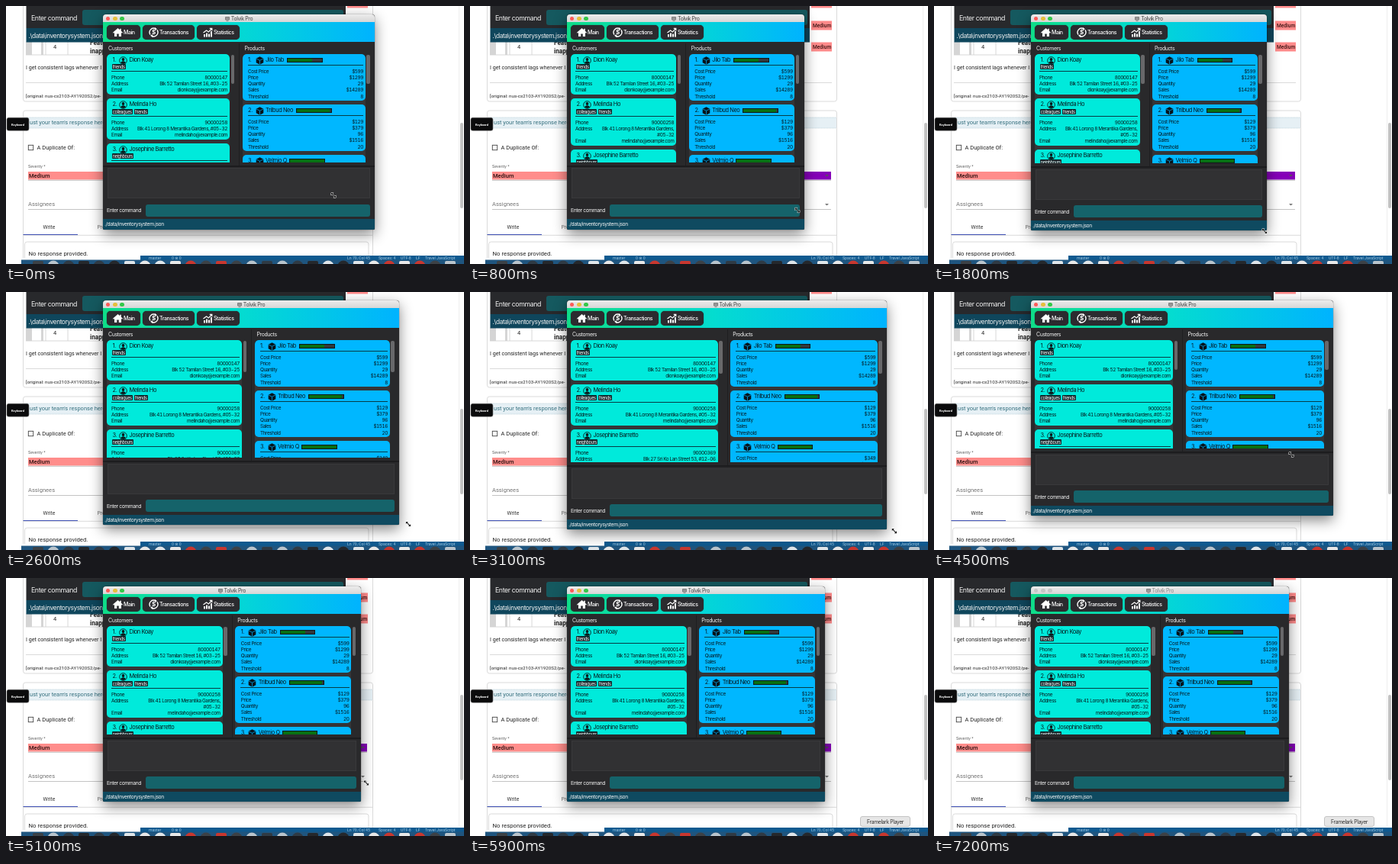
An HTML page that plays this animation: 600 by 338 pixels, repeating every 7.3 s.

```html
<!DOCTYPE html>
<html lang="en">
<head>
<meta charset="utf-8">
<title>Window resize</title>
<style>
html, body { margin: 0; width: 100%; height: 100%; overflow: hidden; background: #fff; }
#stage { position: relative; width: 600px; height: 338px; overflow: hidden; background: #fff; }
#stage svg { display: block; overflow: visible; }
#page { position: absolute; left: 0; top: 0; font-family: Roboto, sans-serif; }
.ui { font-family: Inter, sans-serif; letter-spacing: -.42px; }
#win { position: absolute; left: 127px; top: 11px; background: #29292b; border-radius: 4px 4px 2px 2px;
  overflow: hidden; color: #f4f4f4; font-size: 7px; line-height: 8px; white-space: nowrap; box-shadow: 0 6px 18px rgba(0,0,0,.48), 0 0 1px #000; }
#win div, #win svg { position: absolute; box-sizing: border-box; }
#title { left: 0; top: 0; width: 100%; height: 11px; background: linear-gradient(#ececec, #d4d4d4); }
#name { top: 1.8px; left: 0; width: 100%; text-align: center; color: #444; }
#name svg { position: static; display: inline-block; vertical-align: -1px; margin-right: 2px; }
.light { top: 2.8px; width: 5.6px; height: 5.6px; border-radius: 50%; }
#tools { left: 0; top: 10.3px; width: 100%; height: 26px; background: linear-gradient(90deg, #0fdd88, #04dcd0 46%, #00b3ff); }
.btn { top: 14px; height: 19px; border-radius: 5px; background: #2b2b2f; font-weight: 500; color: #fff; box-shadow: 0 0 1px #111; }
.btn span { position: absolute; left: 22px; top: 5.5px; }
.btn svg { left: 7.5px; top: 3px; }
.head { top: 41px; }
.list { top: 51.5px; bottom: 88px; overflow: hidden; background: #353537; border-radius: 5px 5px 0 0; }
#split { left: 50%; top: 38px; bottom: 84px; width: 1px; background: #1e1e20; }
#rule { left: 0; right: 0; bottom: 82px; height: 2px; background: #1c1c1e; }
.thumb { top: 53px; width: 4.5px; border-radius: 2px; background: #68686a; }
#win .card { position: relative; margin-bottom: 5px; border-radius: 5px; color: #06181c; font-size: 6.4px; }
#win .cust { background: #00eadb; padding: 27.5px 3px 1.4px 6px; }
#win .prod { background: #00b7ff; padding: 19.3px 2.5px 0 7.5px; height: 61.5px; margin-bottom: 4.5px; }
.no, .nm { font-size: 7.4px; }
.no { left: 7.6px; }
.line { height: .8px; background: #073c44; }
#win .row { position: relative; display: flex; justify-content: space-between; line-height: 8.2px; }
.val { text-align: right; font-variant-numeric: tabular-nums; }
.narrow .brk { display: block; }
.tags { left: 6.8px; top: 13.5px; display: flex; gap: 2px; }
.tags span { background: #12282c; color: #fff; font-size: 5.7px; line-height: 7px; padding: 0 1.2px 0 .9px; border-radius: 1px; }
.meter { top: 5.3px; width: 46.5px; height: 6.5px; background: #34383a; border: 1px solid #10161a; }
.meter div { left: 0; top: 0; height: 100%; background: #087012; }
#log { left: 6px; right: 6px; bottom: 40.5px; height: 40px; background: #313133; border: 1px solid #39393b; }
#ask { left: 5px; bottom: 20.5px; font-size: 6.8px; }
#field { left: 55.5px; right: 6px; bottom: 17px; height: 16px; border-radius: 3px; background: #15636a; }
#status { left: 0; width: 100%; bottom: 0; height: 13.5px; background: #0f4a60; padding: 3px 2px; font-size: 6.8px; }
#tip { position: absolute; left: 511px; top: 311.5px; width: 66px; height: 14px; box-sizing: border-box; border: .7px solid #c4c4c4;
  border-radius: 3px; background: #e6e6e6; color: #333; font-size: 6.9px; line-height: 13px; text-align: center; white-space: nowrap; }
#cursor { position: absolute; left: -4px; top: -4px; }
</style>
</head>
<body>
<div id="stage">
<svg id="page" width="600" height="338" viewBox="0 0 600 338">
  <g fill="none" stroke="#d6d6d6" stroke-width=".9">
    <path d="M22.5 0V122q0 3 3 3H477.500q3 0 3-3V0M26 100.500H474"/>
    <path d="M22.500 300V140q0-3 3-3H477.500q3 0 3 3V330M22.500 300V330M22.500 300.300H480.500"/>
    <path d="M24.500 330V312q0-3 3-3H472q3 0 3 3V330"/>
    <path d="M593.500 0V326" stroke="#ececec"/>
  </g>
  <rect x="595" y="153" width="4" height="112" rx="2" fill="#c2c2c2"/>
  <path d="M26 46.500H34V64H26zM46 46.500H49V64H46z" fill="#d5d5d5"/>
  <path d="M52 46.500V64M81 46.500V64M26 64H127" stroke="#cfcfcf" stroke-width=".8"/>
  <g fill="#222">
    <text x="62" y="56" font-size="7.500">4</text>
    <g font-size="8.200" font-weight="700"><text x="110" y="51">Feature</text><text x="110" y="62">inappropriate</text></g>
    <text x="26" y="82.600" font-size="7.100">I get consistent lags whenever I</text>
    <text x="26" y="120" font-size="6.200">[original: nus-cs2103-AY1920S2/pe-</text>
  </g>
  <g class="ui" fill="#f2f2f2">
    <path d="M26.500 0H445V29H26.500z" fill="#28292c"/>
    <rect x="100" y="5" width="342" height="20" rx="3" fill="#15595f"/>
    <path d="M26.500 29H445V47.500H26.500z" fill="#0f465c"/>
    <text x="33" y="19.300" font-size="8.800">Enter command</text>
    <text x="29.500" y="41.500" font-size="8.300">.\data\inventorysystem.json</text>
  </g>
  <path d="M447 0H474V2.500H447zM447 19.500H474V31.500H447zM447 47.500H474V59.500H447z" fill="#ff8a8a"/>
  <g font-size="6.600" font-weight="500" fill="#3a1414"><text x="449" y="28">Medium</text><text x="449" y="56">Medium</text></g>
  <path d="M24 146H480V160H24z" fill="#e6f0f5"/>
  <path d="M24 146H480M24 160H480" stroke="#a9c3cf" stroke-width=".7" stroke-dasharray="1 1"/>
  <text x="31" y="154.900" font-size="7.500" fill="#35707f">ust your team's response here</text>
  <rect x="1" y="146.300" width="29" height="17" rx="2.500" fill="#0b0b0c" stroke="#777" stroke-width=".6"/>
  <text x="15.500" y="156.500" font-size="4" font-weight="700" fill="#fff" text-anchor="middle">Keyboard</text>
  <rect x="29.300" y="182.300" width="6.400" height="6.400" fill="none" stroke="#444" stroke-width=".9"/>
  <text x="40.500" y="188.300" font-size="7.500" fill="#222">A Duplicate Of:</text>
  <text x="29" y="211.800" font-size="5.400" fill="#666">Severity *</text>
  <path d="M29 217H400V227.500H29z" fill="#ff8d8b"/>
  <path d="M400 217H473V227.500H400z" fill="#8500b8"/>
  <path d="M465 221h5l-2.500 2.500z" fill="#555"/>
  <text x="30" y="225" font-size="7.500" font-weight="500" fill="#2a1010">Medium</text>
  <path d="M29 228.300H473M29 266.500H473" stroke="#aaa" stroke-width=".7"/>
  <text x="29" y="261.500" font-size="7.600" fill="#777">Assignees</text>
  <path d="M465 259h5l-2.500 2.500z" fill="#777"/>
  <g font-size="6.800" fill="#333"><text x="48.500" y="292.300">Write</text><text x="119.500" y="292.300" fill="#777">Preview</text></g>
  <path d="M22.500 299.500H94" stroke="#3f51b5"/>
  <text x="29.500" y="326.800" font-size="7.800" fill="#222">No response provided.</text>
  <path d="M176 327H600V338H176z" fill="#0f5a90"/>
  <path d="M20 332.500H600V338H20z" fill="#1f557f"/>
  <g font-size="5.200" fill="#a3c6de">
    <text x="187" y="331.500">master</text><text x="217" y="331.500">0 ⊗ 0</text>
    <text x="447" y="331.500">Ln 70, Col 45</text><text x="488" y="331.500">Spaces: 4</text>
    <text x="517" y="331.500">UTF-8</text><text x="537" y="331.500">LF</text><text x="549" y="331.500">Travel JavaScript</text>
  </g>
  <g id="dock"></g>
</svg>
<div id="win" class="ui">
  <div id="title"></div>
  <div id="tools"></div>
  <div id="name"><svg width="6" height="6" viewBox="0 0 6 6"><path d="M.5.5H5.500V4H.5zM1.500 5.500h3" fill="#999" stroke="#666" stroke-width=".7"/></svg>Tolvik Pro</div>
  <div class="btn" style="left:5px;width:44px"><svg width="13" height="13" viewBox="0 0 13 13"><path d="M6.500 1 0 6.800l.9.900L2 6.800V12H5.200V8.500H7.800V12H11V6.800l1.100.9.900-.9L10.800 4.700V1.800H9.200V3.300z" fill="#fff"/></svg><span>Main</span></div>
  <div class="btn" style="left:52px;width:68px"><svg width="13" height="13" viewBox="0 0 13 13"><path d="M2 9.500A5.400 5.400 0 0 1 8.500 1.500M11 3.500A5.400 5.400 0 0 1 4.500 11.500" fill="none" stroke="#fff" stroke-width="1.400"/><path d="M8 0l3 2.200L8 4zM5 13 2 10.800 5 9z" fill="#fff"/><text x="6.500" y="9.300" font-size="8" font-weight="700" fill="#fff" text-anchor="middle" letter-spacing="0">$</text></svg><span>Transactions</span></div>
  <div class="btn" style="left:123px;width:56px"><svg width="13" height="13" viewBox="0 0 13 13"><path d="M1 9h2v3.500H1zM4 7.500h2v5H4zM7 8.500h2v4H7zM10 5h2v7.500h-2z" fill="#fff"/><path d="M.5 7 4.500 4l3 2L11.500 1.500M8.800 1.300h3v3" fill="none" stroke="#fff" stroke-width="1.200"/></svg><span>Statistics</span></div>
  <div id="split"></div>
  <div class="head" style="left:7px">Customers</div>
  <div class="head" style="left:calc(50% + 7.500px)">Products</div>
  <div class="list" id="custs" style="left:5px;width:calc(50% - 17px)"></div>
  <div class="thumb" style="left:calc(50% - 10.500px)"></div>
  <div class="list" id="prods" style="left:calc(50% + 4.500px);width:calc(50% - 17px)"></div>
  <div class="thumb" style="right:6.500px"></div>
  <div id="rule"></div>
  <div id="log"></div>
  <div id="ask">Enter command</div>
  <div id="field"></div>
  <div id="status">./data/inventorysystem.json</div>
</div>
<div id="tip" class="ui">Framelark Player</div>
<svg id="cursor" width="8" height="8" viewBox="0 0 9 9"><path d="M1 1H4.500L3.200 2.300 6.700 5.800 8 4.500V8H4.500L5.800 6.700 2.300 3.200 1 4.500z" fill="#222" stroke="#fff" stroke-width=".9" paint-order="stroke"/></svg>
</div>
<script>
const $ = id => document.getElementById(id);

const customers = [
  ['Dion Koay', ['friends'], '80000147', 'Blk 52 Tamilan Street 16, #03-25', 'dionkoay@example.com'],
  ['Melinda Ho', ['colleagues', 'friends'], '90000258', 'Blk 41 Lorong 8 Merantika Gardens, <span class="brk">#05-32</span>', 'melindaho@example.com'],
  ['Josephine Barretto', ['neighbours'], '90000369', 'Blk 27 Sri Ko Lan Street 53, #12-06', 'josephine@example.com']
];
// name, meter position, meter level, values
const products = [
  ['Jilo Tab', 58.5, .72, ['$599', '$1299', '29', '$14289', '8']],
  ['Trilbud Neo', 70.5, .96, ['$129', '$379', '96', '$1516', '20']],
  ['Velmio Q', 61.5, 1, ['$349', '$1199', '40', '$9592', '10']]
];
const person = '<svg style="left:16px;top:3px" width="11" height="11" viewBox="0 0 11 11"><circle cx="5.500" cy="5.500" r="4.800" fill="none" stroke="#0a1a1c" stroke-width=".9"/><circle cx="5.500" cy="4" r="1.900" fill="#0a1a1c"/><path d="M2.200 8.800Q2.500 6.300 5.500 6.300T8.800 8.800Q5.500 11 2.200 8.800z" fill="#0a1a1c"/></svg>';
const cube = '<svg style="left:17px;top:3px" width="11" height="11" viewBox="0 0 11 11"><path d="M5.500.3 10.300 2.700V8.200L5.500 10.700.7 8.200V2.700z" fill="#08131a"/><path d="M.7 2.900 5.500 5.200 10.300 2.900M5.500 5.200V10.700" fill="none" stroke="#00b7ff" stroke-width=".7"/></svg>';

const row = (label, value) => `<div class="row"><span>${label}</span><span class="val">${value}</span></div>`;
const heading = (i, left, icon, name) =>
  `<div class="no" style="top:4.4px">${i + 1}.</div>${icon}<div class="nm" style="top:4.4px;left:${left}px">${name}</div>`;

$('custs').innerHTML = customers.map(([name, tags, phone, address, email], i) =>
  `<div class="card cust">${heading(i, 29.5, person, name)}
  <div class="tags">${tags.map(t => `<span>${t}</span>`).join('')}</div>
  <div class="line" style="left:6px;right:3px;top:22.6px"></div>
  ${row('Phone', phone)}${row('Address', address)}${row('Email', email)}</div>`).join('');

$('prods').innerHTML = products.map(([name, x, level, values], i) =>
  `<div class="card prod">${heading(i, 30.5, cube, name)}
  <div class="meter" style="left:${x}px"><div style="width:${level * 100}%"></div></div>
  <div class="line" style="left:7px;right:2.5px;top:14.6px"></div>
  ${['Cost Price', 'Price', 'Quantity', 'Sales', 'Threshold'].map((l, k) => row(l, values[k])).join('')}</div>`).join('');

const lightColors = ['#fc5b57', '#e5bf3c', '#34c748'];
const lights = [6.5, 16, 25].map(x => {
  const d = document.createElement('div');
  d.className = 'light';
  d.style.left = x - 2.8 + 'px';
  $('win').append(d);
  return d;
});

const dockColors = ['#3c4146', '#e8e8e8', '#25282c', '#b9c4cc', '#c8372f', '#dfe5e9', '#2f3a44'];
let icons = '';
for (let i = 0; i < 28; i++) {
  const x = 42 + i * 20, c = dockColors[(i * 3 + (i >> 2)) % 7];
  icons += i % 3 ? `<circle cx="${x}" cy="341" r="7.500" fill="${c}"/>`
    : `<rect x="${x - 7}" y="334" width="14" height="9" rx="2" fill="${c}"/>`;
}
$('dock').innerHTML = icons;

// time, window right, window bottom, pointer x, pointer y
const path = [
  [0, 483, 292.5, 429, 248],
  [600, 438, 292.5, 428, 262],
  [1800, 436, 294, 433, 295],
  [2600, 515, 305, 527, 304],
  [3700, 584, 318.5, 590.5, 324],
  [4500, 523, 293, 468, 213],
  [5000, 464.5, 293, 466, 258],
  [5400, 464.5, 293, 490, 300],
  [5700, 464.5, 293, 544, 350],
  [7300, 464.5, 293, 544, 350]
];
const LOOP = 7300, STEP = 100, TIP = 5700, BLUR = 6600;
const thumbs = document.querySelectorAll('.thumb');

function pose(t) {
  const i = path.findIndex(p => p[0] > t), a = path[i - 1], b = path[i];
  const k = (t - a[0]) / (b[0] - a[0]);
  return a.map((v, j) => v + (b[j] - v) * k);
}

function draw(now) {
  const t = Math.floor(now % LOOP / STEP) * STEP;
  const [, right, bottom, x, y] = pose(t);
  const width = right - 127;
  $('win').style.width = width + 'px';
  $('win').style.height = bottom - 11 + 'px';
  $('custs').classList.toggle('narrow', width / 2 - 17 < 157);
  thumbs.forEach(e => e.style.height = (bottom - 150) * .265 + 'px');
  $('cursor').style.transform = `translate(${x}px, ${y}px)`;
  const idle = t >= BLUR;
  lights.forEach((e, i) => e.style.background = idle ? '#c6c6c6' : lightColors[i]);
  $('name').style.color = idle ? '#888' : '#444';
  $('tip').style.visibility = t >= TIP ? 'visible' : 'hidden';
}

const start = performance.now();
function tick() {
  draw(performance.now() - start);
  requestAnimationFrame(tick);
}
tick();
</script>
</body>
</html>
```
